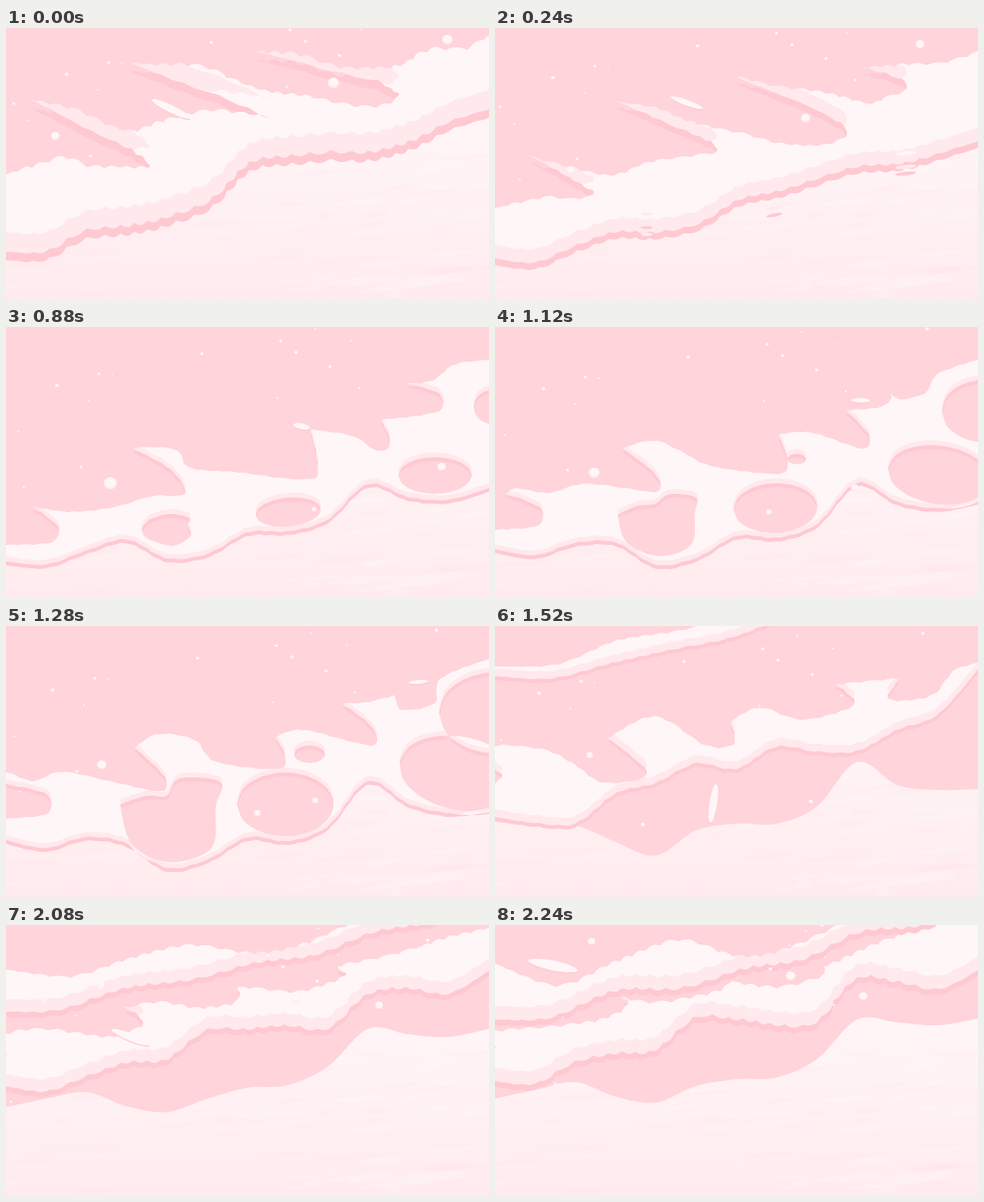
An HTML page with a canvas that plays this animation: 500 px wide and 281 px high, repeating every 2.32 s.

```html
<!DOCTYPE html>
<html lang="en">
<head>
<meta charset="utf-8">
<title>Pink tide</title>
<style>
html, body { margin: 0; width: 100%; height: 100%; overflow: hidden; background: #ffd4db; }
canvas { display: block; }
</style>
</head>
<body>
<canvas id="sea" width="500" height="281"></canvas>
<script>
const ctx = document.getElementById('sea').getContext('2d');
const W = 500, H = 281, LOOP = 2320;
const WATER = '#ffd4db', SHADOW = '#ffc9d2', TONE = '#ffe9ed', FOAM = '#fff6f7';

// Catmull-Rom through flat x,y pairs, sampled at n + 1 places
function spline(p, n) {
  const last = p.length / 2 - 1, out = [];
  const at = (i, c) => p[2 * Math.max(0, Math.min(last, i)) + c];
  for (let k = 0; k <= n; k++) {
    const u = k / n * last, i = Math.min(Math.floor(u), last - 1), f = u - i;
    out.push([0, 1].map(c => {
      const a = at(i - 1, c), b = at(i, c), d = at(i + 1, c), e = at(i + 2, c);
      return b + f / 2 * (d - a + f * (2 * a - 5 * b + 4 * d - e + f * (3 * (b - d) + e - a)));
    }));
  }
  return out;
}

// Each piece starts in a sharp corner at the end of the one before
const edge = pieces => pieces.map((p, i) =>
  spline(i ? [...pieces[i - 1].slice(-2), ...p] : p, 90));
// Heights at even steps across the stage
const profile = ys => [spline(ys.flatMap((y, i) => [i * W / (ys.length - 1), y]), 240)];
const ring = p => spline([...p, p[0], p[1]], 70);

function oval(x, y, rx = 0, ry = 0, rot = 0) {
  const p = [];
  for (let i = 0; i < 12; i++) {
    const a = Math.PI * (1 + i / 6), u = rx * Math.cos(a), v = ry * Math.sin(a);
    p.push(x + u * Math.cos(rot) - v * Math.sin(rot), y + u * Math.sin(rot) + v * Math.cos(rot));
  }
  return p;
}

// look: bump height, shadow drop, depth of the shaded rim
function pose(t, look, top, low, drops, fleck, { holes = [], sand = low, upTop, upLow } = {}) {
  return {
    t, look, drops, fleck, top: edge(top), low: profile(low), sand: profile(sand),
    holes: holes.map(ring),
    upTop: upTop ? profile(upTop) : [], upLow: upLow ? profile(upLow) : []
  };
}

const start0 = pose(0, [2.4, 9, 20], [
  [0,152, 35,142, 62,133, 92,143, 147,139, 23,73],
  [70,85, 125,105, 160,98, 215,84, 269,91, 128,36],
  [165,38, 210,42, 270,66, 320,72, 385,82, 398,62, 258,24],
  [300,28, 345,39, 400,42], [412,38],
  [440,21, 478,20, 500,8]],
  [232,231,211,204,197,180,142,133,128,130,117,98,84],
  [51,112,4.5, 339,57,6, 457,12,5.5], [171,84,22,4,.45],
  { holes: [oval(157,206), oval(288,186), oval(425,143), oval(510,80), oval(310,140)] });

const thin = pose(480, [.8, 5, 8], [
  [0,222, 35,218, 63,214, 57,202, 43,189],
  [62,198, 110,200, 155,181, 193,182, 183,151, 121,115],
  [168,129, 185,149, 235,151, 270,168, 316,155, 317,133, 238,76],
  [290,92, 335,96, 380,116],
  [400,104, 448,87, 425,63, 345,43],
  [400,55, 440,54, 500,40]],
  [246,254,242,217,228,227,216,207,183,159,164,163,151],
  [105,182,3.5, 304,130,3.8, 423,22,3.8], [226,71,13,2,.25],
  { holes: [oval(157,208,12,3), oval(290,188,17,3.5,-.2), oval(425,145,22,4,-.1), oval(515,80), oval(310,145)] });

const open = pose(880, [.6, 4, 5], [
  [0,226, 45,224, 54,208, 27,186],
  [65,192, 110,187, 150,176, 185,173, 170,148, 130,125],
  [175,127, 191,146, 240,151, 313,158, 323,143, 315,106],
  [358,113, 385,129, 398,120, 388,96],
  [447,88, 448,69, 412,58],
  [441,56, 465,39, 500,34]],
  [243,246,232,220,240,235,213,212,199,163,176,179,167],
  [108,162,7, 319,189,2.5, 451,145,4.5], [306,103,9,3,.2],
  { holes: [
    [140,209, 150,199, 170,194, 190,198, 188,206, 191,217, 172,227, 146,219],
    oval(292,192,34,15,-.1), oval(444,154,38,19), oval(505,83,21,18), oval(310,143)] });

const wideTop = [
  [0,200, 42,195, 42,175, 0,164],
  [0,152, 28,161, 58,151, 110,162, 160,171, 163,155, 133,126],
  [158,112, 195,118, 217,141, 280,148, 289,135, 279,115],
  [310,108, 378,124, 379,105, 347,80],
  [375,79, 402,72],
  [410,87, 443,80, 450,55, 500,34]];
const wideDrops = [99,144,5, 260,194,3.5, 320,181,3.3], wideFleck = [427,58,10,2,-.1];

const wide = pose(1280, [.6, 4, 5], wideTop,
  [222,230,219,225,251,242,219,223,207,161,184,194,189], wideDrops, wideFleck,
  { holes: [
    [118,185, 145,176, 166,176, 180,158, 222,162, 217,188, 213,230, 170,245, 130,226],
    oval(289,185,50,33), oval(470,153,64,38,.2), oval(508,90,60,42), oval(314,133,16,9)] });

const farTop = [42,40,16,5,-8,-20,-30,-40,-50], farLow = [52,54,37,24,10,-12,-22,-32,-42];
const lift = ys => ys.map(y => y - 55);

// The foam now parts from the sand
const parting = pose(1280, [.6, 4, 5], wideTop,
  [222,230,218,187,170,156,165,152,170,161,128,68,48], wideDrops, wideFleck,
  { sand: [222,230,219,217,244,232,204,218,202,161,176,190,186],
    upTop: lift(farTop), upLow: lift(farLow) });

const adrift = pose(1520, [.9, 4, 8], [
  [0,163, 8,156, 0,148],
  [0,125, 50,128, 82,144, 112,162, 158,153, 117,116],
  [165,94, 217,123, 247,122, 244,99],
  [275,85, 320,97, 372,82, 352,60],
  [418,55],
  [408,76, 452,72, 475,47, 500,38]],
  [198,204,205,173,163,142,148,125,130,130,107,92,45],
  [98,134,3.5, 153,206,2.3, 327,182,2.3], [226,184,4,20,.15],
  { sand: [203,207,207,224,238,212,205,205,187,141,165,170,169], upTop: farTop, upLow: farLow });

const rising = pose(1840, [1.4, 5, 11], [
  [0,146, 0,138],
  [0,119, 30,109, 55,127, 100,149, 147,129, 111,101],
  [155,82, 200,100, 248,97, 232,74],
  [265,73, 305,76, 366,59, 348,44],
  [425,50],
  [460,33, 500,13]],
  [175,184,180,156,154,128,123,106,117,97,75,78,48],
  [95,133,3.8, 291,112,4.8, 394,97,3.5], [233,228,14,2,.65],
  { sand: [202,194,189,203,209,200,182,178,158,122,132,134,124],
    upTop: [56,40,33,28,25,14,-8,-18,-28], upLow: [78,74,60,45,31,26,11,-8,-18] });

const merged = pose(2240, [2, 6, 14], [
  [0,128, 0,124],
  [0,112, 62,104, 110,99, 137,84, 131,75],
  [175,80, 225,70, 245,58],
  [295,65, 338,52, 340,43],
  [434,4],
  [470,-4, 500,-5]],
  [162,164,143,132,130,95,98,104,99,56,58,67,47],
  [100,17,4, 306,53,5, 381,74,4.5], [60,42,26,5,.2],
  { sand: [180,171,163,178,184,167,160,158,139,98,101,104,97],
    upTop: [40,62,39,15,32,21,-8,-18,-28], upLow: [98,95,67,67,47,37,9,0,-18] });

const rush = [start0, thin, open, wide], ebb = [parting, adrift, rising, merged];

const mix = (a, b, f) => Array.isArray(a) ? a.map((v, i) => mix(v, b[i], f)) : a + (b - a) * f;

function poseAt(t) {
  const set = t <= wide.t ? rush : ebb;
  let i = 0;
  while (i < set.length - 2 && t >= set[i + 1].t) i++;
  const a = set[i], b = set[i + 1], f = Math.min(1, (t - a.t) / (b.t - a.t)), out = {};
  for (const k in a) out[k] = mix(a[k], b[k], f);
  return out;
}

// Push scallops out along the edge, fading towards sharp corners
function ruffle(pieces, bump) {
  let s = 0;
  return pieces.flatMap(p => p.map(([x, y], i) => {
    const end = p.length - 1, a = p[Math.max(0, i - 1)], b = p[Math.min(end, i + 1)];
    const dx = b[0] - a[0], dy = b[1] - a[1], d = Math.hypot(dx, dy) || 1;
    s += d / 2;
    const fade = Math.min(1, 8 * Math.min(i, end - i) / end);
    const h = bump * fade * (1.5 * Math.abs(Math.sin(s / 5.5 + Math.sin(s / 23))) - .9 + .5 * Math.sin(s / 17));
    return [x + dy / d * h, y - dx / d * h];
  }));
}

function addLoop(path, pts) {
  pts.forEach(([x, y], i) => i ? path.lineTo(x, y) : path.moveTo(x, y));
  path.closePath();
}

function drawFoam(top, low, holes, [bump, drop, depth]) {
  const path = new Path2D();
  addLoop(path, [...ruffle(top, bump), ...ruffle(low, -bump).reverse()]);
  holes.forEach(h => addLoop(path, h));
  const fill = (color, dy) => {
    ctx.save();
    ctx.translate(0, dy);
    ctx.fillStyle = color;
    ctx.fill(path, 'evenodd');
    ctx.restore();
  };
  fill(SHADOW, drop);
  fill(TONE, 0);
  ctx.save();
  ctx.clip(path, 'evenodd');
  fill(FOAM, -depth);
  ctx.restore();
}

let seed = 7;
const rand = () => (seed = seed * 16807 % 2147483647) / 2147483647;
const many = (n, make) => Array.from({ length: n }, make);
const grains = many(80, () => [rand() * W, 130 + rand() * 150, 8 + rand() * 28, 1 + rand() * 3]);
const spray = many(20, () => {
  const x = rand() * W;
  return [x, 170 - .28 * x - rand() * 110, .8 + rand() * 1.3];
});

const sandTint = ctx.createLinearGradient(0, 110, 0, H);
sandTint.addColorStop(0, '#fff5f6');
sandTint.addColorStop(1, '#ffebee');

function blob(x, y, rx, ry, rot, color) {
  ctx.fillStyle = color;
  ctx.beginPath();
  ctx.ellipse(x, y, rx, ry, rot, 0, 7);
  ctx.fill();
}

function drawSand(edges) {
  const path = new Path2D();
  addLoop(path, [...edges.flat(), [W, H], [0, H]]);
  ctx.save();
  ctx.clip(path);
  ctx.fillStyle = sandTint;
  ctx.fillRect(0, 0, W, H);
  grains.forEach(([x, y, rx, ry], i) =>
    blob(x, y, rx, ry, -.08, i % 2 ? 'rgba(255,222,228,.16)' : 'rgba(255,250,250,.2)'));
  ctx.restore();
}

function drawDrop(x, y, r) {
  blob(x, y, r, r * .9, 0, TONE);
  blob(x, y - r * .15, r * .85, r * .75, 0, FOAM);
}

function draw(t) {
  const p = poseAt(t);
  ctx.fillStyle = WATER;
  ctx.fillRect(0, 0, W, H);
  drawSand(p.sand);
  drawFoam(p.top, p.low, p.holes, p.look);
  if (p.upTop.length) drawFoam(p.upTop, p.upLow, [], p.look);
  const [fx, fy, ...shape] = p.fleck;
  blob(fx, fy + 1.2, ...shape, SHADOW);
  blob(fx, fy, ...shape, FOAM);
  for (let i = 0; i < p.drops.length; i += 3) drawDrop(...p.drops.slice(i, i + 3));
  for (const [x, y, r] of spray) drawDrop(x - t / 90, y + t / 70, r);
}

// Pictures are held for 80 or 160 ms in a 400 ms rhythm
function held(t) {
  if (t < 80) return 0;
  const q = (t - 80) % 400;
  return Math.round(t - q + (q < 160 ? 0 : q < 240 ? 160 : 240));
}

const start = performance.now();
let shown = -1;
function tick() {
  const t = held((performance.now() - start) % LOOP);
  if (t !== shown) draw(shown = t);
  requestAnimationFrame(tick);
}
tick();
</script>
</body>
</html>
```
